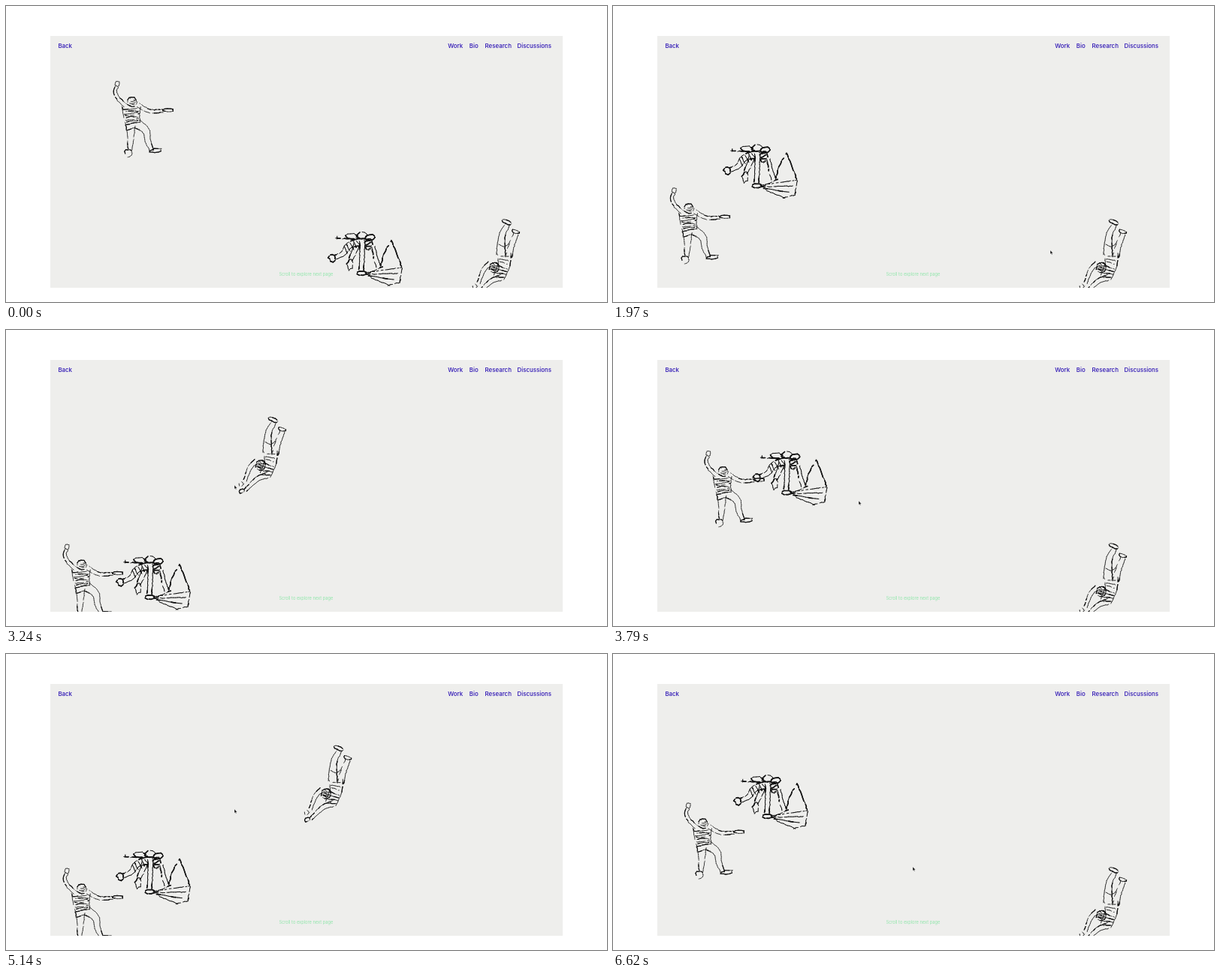
These frames come from a looping animation (800x395 px, 6660 ms). An HTML page:

```html
<!DOCTYPE html>
<html lang="en">
<head>
<meta charset="utf-8">
<title>Falling figures</title>
<style>
html, body { margin: 0; width: 100%; height: 100%; overflow: hidden; background: #fff; }
svg { display: block; width: 100%; height: 100%; }
text { font-family: Inter, sans-serif; }
.nav { font-size: 7.9px; font-weight: 500; fill: #2c13b4; }
.hint { font-size: 5.7px; fill: #90e6ab; }
#figures path { fill: none; stroke: #111; stroke-linecap: round; stroke-linejoin: round; }
</style>
</head>
<body>
<svg viewBox="0 0 800 395">
<defs><clipPath id="panel"><rect x="59" y="40" width="682" height="336"/></clipPath></defs>
<rect x="59" y="40" width="682" height="336" fill="#eeeeec"/>
<g class="nav">
  <text x="69.4" y="56">Back</text>
  <text x="588.3" y="56">Work</text>
  <text x="616.8" y="56">Bio</text>
  <text x="637.6" y="56">Research</text>
  <text x="680.6" y="56">Discussions</text>
</g>
<text class="hint" x="363.4" y="359.6">Scroll to explore next page</text>
<g id="figures" clip-path="url(#panel)"></g>
<path id="cursor" d="M0 0V5.2L1.2 4.2L2 6L2.9 5.6L2.1 3.9H3.7Z" fill="#111" stroke="#fff" stroke-width=".35"/>
</svg>
<script>
const LOOP = 6660, START = 760, PASS = 2512, FALL = 0.1175;
const cursor = document.getElementById("cursor");

// ---- hand-drawn ink ----
let seed = 7;
const rnd = () => (seed = (seed * 16807) % 2147483647) / 2147483647;
const jitter = r => (rnd() * 2 - 1) * r;
const parse = s => s.split(" ").map(p => p.split(",").map(Number));

// Smooth curve through a few points, sampled about every 2.5 px
function curve(points) {
  const out = [];
  for (let i = 0; i < points.length - 1; i++) {
    const b = points[i], c = points[i + 1];
    const a = points[i - 1] || b, d = points[i + 2] || c;
    const n = Math.ceil(Math.hypot(c[0] - b[0], c[1] - b[1]) / 2.5);
    for (let k = i ? 1 : 0; k <= n; k++) {
      const u = k / n;
      out.push([0, 1].map(j => b[j] + u / 2 * (c[j] - a[j]
        + u * (2 * a[j] - 5 * b[j] + 4 * c[j] - d[j] + u * (3 * (b[j] - c[j]) + d[j] - a[j])))));
    }
  }
  return out;
}

// A pen that wobbles, lifts now and then and presses harder in short runs
function makePen(weight) {
  let light = "", dark = "";
  function trace(samples, press = 0.12) {
    let last, hard = false;
    for (const [x, y] of samples) {
      const here = `${(x + jitter(0.4)).toFixed(1)} ${(y + jitter(0.4)).toFixed(1)}`;
      if (last && rnd() > 0.09) {
        light += `M${last}L${here}`;
        if (hard) dark += `M${last}L${here}`;
      }
      hard = rnd() < (hard ? 0.65 : press);
      last = here;
    }
  }
  const line = (s, press) => trace(curve(parse(s)), press);

  // Two outlines around a spine, tapering from width w0 to w1
  function limb(s, w0, w1) {
    const spine = curve(parse(s)), end = spine.length - 1;
    for (const side of [-0.5, 0.5]) {
      trace(spine.map(([x, y], i) => {
        const p = spine[Math.max(0, i - 1)], q = spine[Math.min(end, i + 1)];
        const dx = q[0] - p[0], dy = q[1] - p[1];
        const k = side * (w0 + (w1 - w0) * i / end) / (Math.hypot(dx, dy) || 1);
        return [x - dy * k, y + dx * k];
      }));
    }
  }

  function oval(x, y, rx, ry, turn = 0, rough = 0.15, press = 0.3) {
    const n = Math.round(6 + (rx + ry) / 2), ring = [];
    for (let i = 0; i <= n; i++) {
      const a = i / n * 2 * Math.PI, r = 1 + jitter(rough);
      const u = rx * r * Math.cos(a), v = ry * r * Math.sin(a);
      ring.push([x + u * Math.cos(turn) - v * Math.sin(turn), y + u * Math.sin(turn) + v * Math.cos(turn)]);
    }
    trace(ring, press);
  }

  // Creases laid across the way from one point to another
  function folds(s, width, count) {
    const [[x0, y0], [x1, y1]] = parse(s);
    const len = Math.hypot(x1 - x0, y1 - y0), nx = (y0 - y1) / len, ny = (x1 - x0) / len;
    for (let i = 0; i < count; i++) {
      const u = i / (count - 1), tilt = jitter(2.5);
      const cx = x0 + (x1 - x0) * u, cy = y0 + (y1 - y0) * u;
      trace(curve([-0.5, 0, 0.5].map(k => {
        const across = k * width * (0.65 + rnd() * 0.35);
        return [cx + nx * across, cy + ny * across + tilt * k + jitter(1)];
      })));
    }
  }

  const markup = () => `<path d="${light}" stroke-width="${weight}"/><path d="${dark}" stroke-width="${weight * 1.7}"/>`;
  return { line, limb, oval, folds, markup };
}

// ---- figures ----
function leaper({ line, limb, oval, folds }) {
  oval(148, 104, 3, 3.5);
  limb("148,107 145,114 149,123 159,133", 4, 5);
  oval(167.5, 128, 6.5, 6);
  folds("168,124 168,132", 9, 4);
  limb("176,132 190,140 209,140", 6, 3.5);
  oval(216, 139, 7, 2);
  limb("167,134 167,145 169,157", 25, 19);
  folds("167,137 169,157", 22, 8);
  line("160,166 171,163 178,166");
  limb("166,160 166,175 165,192", 12, 5);
  limb("174,157 186,166 189,180 194,193", 12, 5);
  oval(163, 196, 4.5, 5, 0, 0.3, 0.5);
  oval(199, 193, 8, 2.6, -0.1, 0.2, 0.5);
}

function diver({ line, limb, oval, folds }) {
  oval(666, 288, 6.5, 2.5, 0.4);
  oval(678, 301, 5.5, 2.2, 0.4);
  limb("668,291 661,304 659,318 659,332", 6, 12);
  limb("679,304 673,319 669,336", 6, 9);
  line("656,318 663,321 670,317");
  limb("663,330 663,345 656,362", 18, 14);
  folds("664,334 658,362", 16, 7);
  oval(650, 349, 6.5, 7, 0.4, 0.1, 0.6);
  folds("652,344 649,354", 10, 7);
  limb("645,343 636,352 629,370", 7, 4);
  limb("660,362 645,368 630,382", 8, 4);
  oval(624, 374, 4, 2.5, 0, 0.3, 0.5);
  oval(625, 384, 4.5, 2.5, -0.3, 0.3, 0.5);
}

function acrobat({ line, limb, oval, folds }) {
  line("439,310 461,311 478,310", 0.3);
  line("441,307 440,313");
  oval(460, 307, 7, 3.5);
  oval(474, 306, 7, 4.5);
  oval(485, 309, 6, 4);
  oval(483, 318, 5.5, 7);
  folds("481,311 484,323", 9, 5);
  limb("470,315 456,320 449,330 439,335", 10, 5);
  folds("468,315 452,325", 10, 5);
  oval(434, 336, 5.5, 4.5, 0.3, 0.3, 0.5);
  limb("467,318 463,329 458,339", 8, 5);
  oval(458, 345, 4, 7, 0.2, 0.25);
  limb("474,314 474,333 473,352", 7, 6);
  oval(474, 357, 6, 3.5, 0.1, 0.3, 0.5);
  limb("489,321 492,336 496,348", 4, 6);
  // umbrella: edges and ribs from its handle
  line("499,348 503,331 513,313");
  line("513,313 523,338 527,350", 0.3);
  line("527,350 524,369", 0.3);
  line("524,369 508,373");
  for (let i = 0; i < 4; i++) line(`${478 + i * 2},${356 + i * 2} ${526 - i * 5},${349 + i * 8}`);
  line("480,358 501,348");
}

// ---- motion: each move is [start, end, dx, dy]; released figures sink to a floor ----
const actors = [
  { paint: leaper, weight: 0.7, floor: 185.5, from: 0, moves: [[80, 1250, -67, 0]] },
  { paint: diver, weight: 0.75, floor: 0, from: 1550, moves: [[1550, 2040, -311, -278]] },
  { paint: acrobat, weight: 1, floor: 0, from: 0, moves: [[0, 480, -240, -197], [420, 1100, -42, -62]] }
];
const pointer = [[0, 190, -143, -90], [190, 520, -14, -2], [560, 840, 72, 56], [840, 1400, 249, 57], [1550, 1830, -344, -134]];

const smooth = u => (u = Math.min(1, Math.max(0, u)), u * u * (3 - 2 * u));
const travel = (moves, t) => moves.reduce(([x, y], [a, b, dx, dy]) => {
  const k = smooth((t - a) / (b - a));
  return [x + dx * k, y + dy * k];
}, [0, 0]);
const place = (node, x, y) => node.setAttribute("transform", `translate(${x.toFixed(2)} ${y.toFixed(2)})`);

for (const actor of actors) {
  const pen = makePen(actor.weight);
  actor.paint(pen);
  actor.node = document.createElementNS("http://www.w3.org/2000/svg", "g");
  actor.node.innerHTML = pen.markup();
  document.getElementById("figures").append(actor.node);
}

function draw(ms) {
  const t = ms % LOOP, phase = t < START ? 0 : (t - START) % PASS;
  for (const { node, floor, from, moves } of actors) {
    const [x, y] = travel(moves, phase);
    place(node, x, Math.min(floor, y + FALL * Math.max(0, phase - from)));
  }
  const [x, y] = travel(pointer, phase);
  place(cursor, 484 + x, 320 + y);
  cursor.style.display = t < START ? "none" : "";
}

const begin = performance.now();
function tick() {
  draw(performance.now() - begin);
  requestAnimationFrame(tick);
}
draw(0);
requestAnimationFrame(tick);
</script>
</body>
</html>
```
